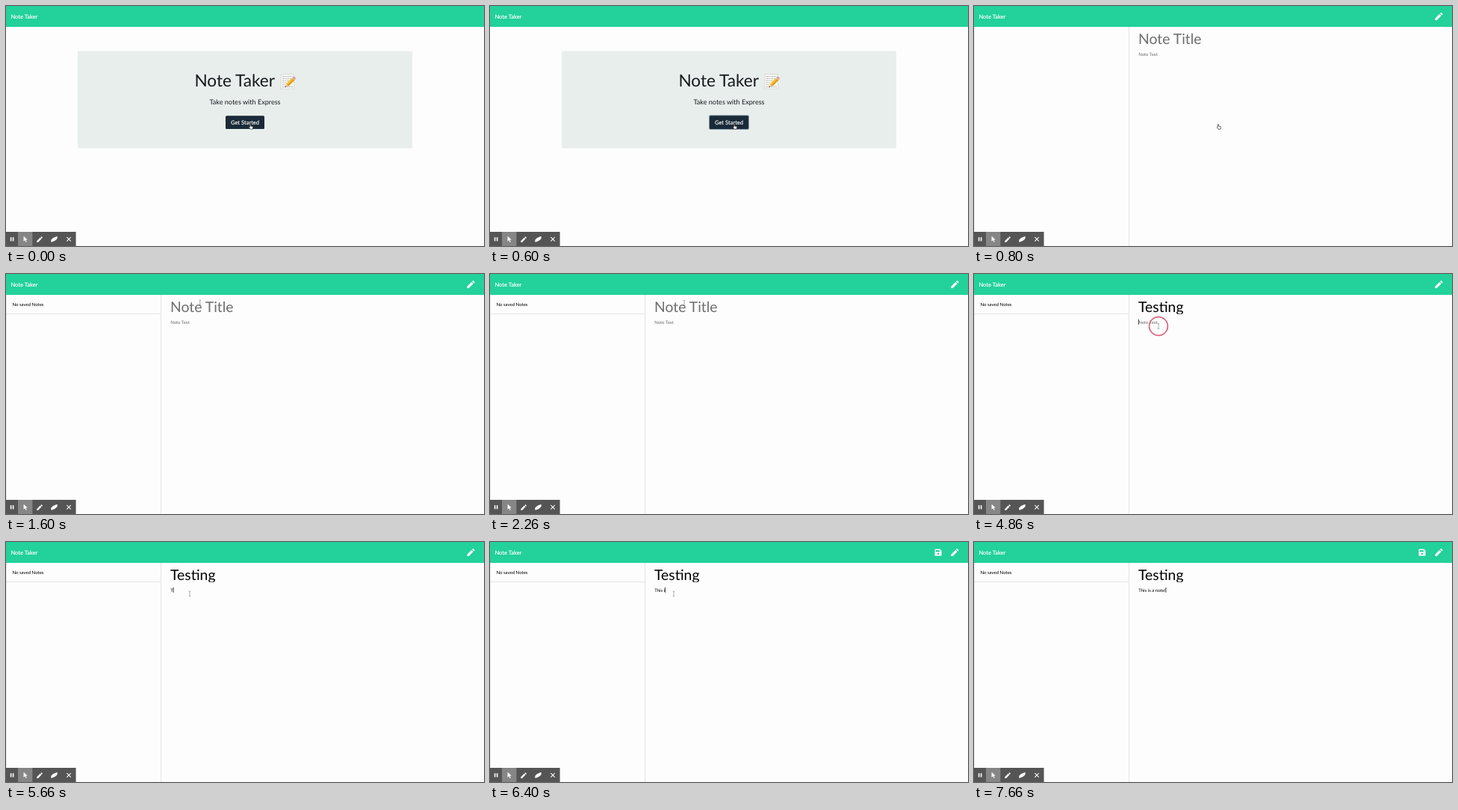
These frames come from a looping animation (640x322 px, 8000 ms). An HTML page:

```html
<!DOCTYPE html>
<html lang="en">
<head>
<meta charset="utf-8">
<title>Note Taker</title>
<style>
  html, body { margin: 0; width: 100%; height: 100%; overflow: hidden; background: #fdfdfd; }
  svg { display: block; width: 640px; height: 322px; }
  text { font-family: Lato, sans-serif; white-space: pre; text-rendering: geometricPrecision; }
  .light { fill: #fff; stroke: #fff; stroke-width: .15; font-size: 7.57px; }
  .title { font-size: 19.37px; }
  .body { font-size: 6.05px; }
  .hint { fill: #6e6e6e; }
  .rule { stroke: #e3e4e4; fill: none; }
  .mid { text-anchor: middle; }
</style>
</head>
<body>
<svg viewBox="0 0 640 322">
  <defs>
    <clipPath id="titleClip"><path d="M219 30H640V53.8H219z"/></clipPath>
    <path id="pencil" d="M0 7.9V10.2H2.3L8.2 4.3 5.9 2zM6.6 1.3 8.9 3.6 10 2.5Q10.4 2.1 10 1.6L8.6.2Q8.1-.2 7.7.2z"/>
  </defs>

  <rect width="640" height="322" fill="#fdfdfd"/>
  <rect width="640" height="28" fill="#23d19a"/>
  <text class="light" x="6.4" y="16.8">Note Taker</text>

  <g id="home">
    <rect x="96" y="60.5" width="448" height="130.3" rx="1.6" fill="#e8eeec"/>
    <text x="252.4" y="108" font-size="22.6" fill="#16191c">Note Taker</text>
    <g id="memo">
      <path d="M368.5 91.5H385L386 111H367.3z" fill="#f8f8f5" stroke="#c9cac6" stroke-width=".6"/>
      <path d="M370 94.5H383.5M370 97.3H384M369.8 100.1H379M369.6 102.9H376M369.5 105.7H374M369.3 108.5H384" stroke="#a9abae" stroke-width=".8" stroke-dasharray="3 .7 2 .6"/>
      <path d="M373.3 109.3 375 104.2 378.3 107.6z" fill="#e9c79a"/>
      <path d="M373.3 109.3 373.9 107.4 375.2 108.7z" fill="#333"/>
      <path d="M375 104.2 383 96.3 386.3 99.6 378.3 107.6z" fill="#f6c52f"/>
      <path d="M376.7 105.9 384.7 98 386.3 99.6 378.3 107.6z" fill="#e09a20"/>
      <path d="M383 96.3 384 95.3 387.3 98.6 386.3 99.6z" fill="#b9bcc0"/>
      <path d="M384 95.3Q385.4 94 387 95.6T387.3 98.6z" fill="#ea8c92"/>
    </g>
    <text class="mid" x="320" y="131.6" font-size="9.08" fill="#16191c">Take notes with Express</text>
    <rect id="focus" x="293" y="146.2" width="54" height="19.9" rx="2" fill="#8a9ba6"/>
    <rect x="294" y="147.2" width="52" height="17.9" rx="1.5" fill="#1a2a38"/>
    <text class="light mid" x="320" y="158.8">Get Started</text>
  </g>

  <g id="notes">
    <path class="rule" d="M.5 28V322M207.5 28V322"/>
    <g id="list">
      <path class="rule" d="M0 53.5H207"/>
      <text class="body" x="8.4" y="43.1">No saved Notes</text>
    </g>
    <g clip-path="url(#titleClip)"><text id="title" class="title" x="220" y="50.7"></text></g>
    <text id="body" class="body" x="220.2" y="66.5"></text>
    <rect id="titleCaret" y="33.3" width=".8" height="20.5"/>
    <rect id="bodyCaret" y="60.8" width=".7" height="7"/>
    <use href="#pencil" x="617.4" y="8.8" fill="#fff"/>
    <path id="save" fill="#fff" fill-rule="evenodd" d="M596.4 9.6H602.4L604.6 11.8V17.6Q604.6 18.5 603.7 18.5H596.4Q595.5 18.5 595.5 17.6V10.5Q595.5 9.6 596.4 9.6zM596.8 10.9V13.3H601.9V10.9zM600 14.5a1.3 1.3 0 1 0 .01 0z"/>
  </g>

  <circle id="ring" r="12.4" fill="none" stroke="#d9637c" stroke-width="1.7"/>
  <path id="hand" fill="#fff" stroke="#333" stroke-width=".7" stroke-linejoin="round" d="M-1.6-3Q-.8-3.8-.3-3V-.8L2-.4Q2.7-.2 2.6.5L2.2 3.2H-1.1L-2.7.6Q-2.5-.3-1.5.4z"/>
  <path id="beam" fill="none" stroke="#777" stroke-width=".6" d="M-1.3-3.6Q-.1-3.6 0-2.8Q.1-3.6 1.3-3.6M0-2.8V2.8M-1.3 3.6Q-.1 3.6 0 2.8Q.1 3.6 1.3 3.6"/>

  <g id="tools">
    <rect y="303" width="93.6" height="19" fill="#555"/>
    <rect x="16" y="303" width="19.4" height="19" fill="#868686"/>
    <g fill="#fff">
      <path d="M5.8 310.2H7.4V315.6H5.8zM8.8 310.2H10.4V315.6H8.8z"/>
      <path d="M23.6 308.8 28.6 313.6 26.5 313.8 27.8 316.6 26.7 317.1 25.5 314.2 23.6 315.7z"/>
      <use href="#pencil" transform="translate(41.3 309.3) scale(.75)"/>
      <path d="M60.5 313.5 63.3 311 67.5 309.2 69 309.6 68.3 312.4 65.4 315 61.3 316.8 60.3 316.2z"/>
    </g>
    <path d="M81.4 310.2 86.8 315.6M86.8 310.2 81.4 315.6" stroke="#fff" stroke-width="1.1"/>
  </g>
</svg>
<script>
const LOOP = 8000, TICK = 1000 / 15;
const $ = id => document.getElementById(id);
const show = (id, on) => $(id).style.display = on ? '' : 'none';
const within = (k, a, b) => k >= a && k < b;

// Ticks at which each character is typed.
const titleKeys = [40, 44, 47, 49, 50, 53, 55];
const bodyKeys = [85, 87, 88, 90, 93, 96, 97, 99, 100, 101, 105, 108, 109, 112, 115];

// Mouse stops: tick, x, y.
const stops = [[0, 328, 162], [13, 328, 162], [21, 259.5, 38], [23, 259.5, 38], [25, 260, 39],
  [61, 260, 39], [71, 247, 70], [76, 247, 70], [78, 246, 69.5]];
// Mouse presses: first tick, end tick.
const presses = [[2, 6], [27, 29], [72, 76]];

function mouse(k) {
  const i = stops.findIndex(s => s[0] > k);
  if (i < 0) return stops[stops.length - 1].slice(1);
  const [k0, x0, y0] = stops[i - 1], [k1, x1, y1] = stops[i];
  const u = (k - k0) / (k1 - k0), e = u * u * (3 - 2 * u);
  return [x0 + (x1 - x0) * e, y0 + (y1 - y0) * e];
}

function field(id, k, text, keys, hint, caretOn) {
  const el = $(id), n = keys.filter(t => t <= k).length;
  el.textContent = n ? text.slice(0, n) : hint;
  el.classList.toggle('hint', !n);
  const width = n ? el.getComputedTextLength() : 0;
  $(id + 'Caret').setAttribute('x', +el.getAttribute('x') + width);
  show(id + 'Caret', caretOn);
}

function draw(k) {
  const home = k < 12;
  show('home', home);
  show('notes', !home);
  show('focus', k >= 2);
  show('list', k >= 14);
  show('save', k >= 86);
  if (!home) {
    field('title', k, 'Testing', titleKeys, 'Note Title',
      within(k, 27, 34) || within(k, 40, 63) || within(k, 70, 73));
    field('body', k, 'This is a note!', bodyKeys, 'Note Text',
      within(k, 73, 81) || k >= 85);
  }

  const at = `translate(${mouse(k)})`;
  for (const id of ['hand', 'beam', 'ring']) $(id).setAttribute('transform', at);
  show('hand', k < 14);
  show('beam', within(k, 14, 40) || within(k, 62, 105));

  const press = presses.find(([a, b]) => within(k, a, b));
  show('ring', press);
  if (press) $('ring').setAttribute('opacity', k === press[0] ? .6 : k > press[0] + 2 ? .5 : 1);
}

const start = performance.now();
let last = -1;
function frame() {
  const t = (performance.now() - start) % LOOP;
  const k = Math.min(119, Math.floor((t + 7) / TICK));
  if (k !== last) draw(last = k);
  requestAnimationFrame(frame);
}
frame();
</script>
</body>
</html>
```
